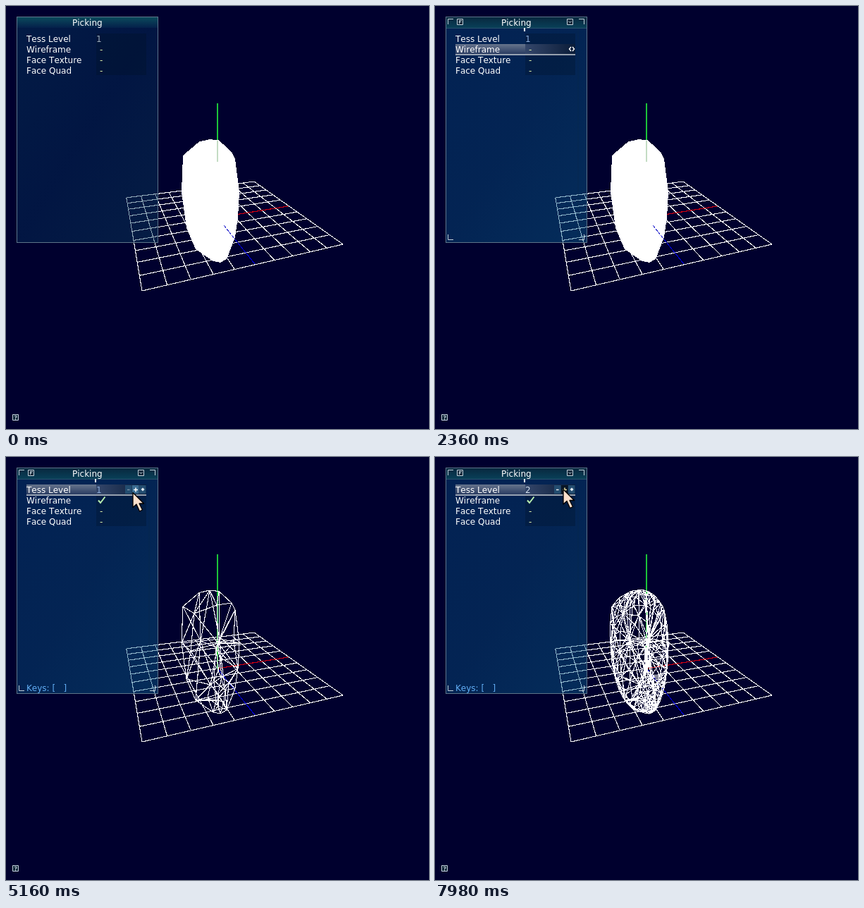
An HTML page for the animation above (8000 ms loop, 600x600 px).

```html
<!DOCTYPE html>
<html lang="en">
<head>
<meta charset="utf-8">
<title>Picking</title>
<style>
  html, body { margin: 0; width: 100%; height: 100%; overflow: hidden; background: #00002e; }
  svg { display: block; width: 100vw; height: 100vh; }
  text { font: 12px "DejaVu Sans", sans-serif; font-kerning: none; fill: #fff; white-space: pre; }
  .line { fill: none; stroke: #fff; stroke-width: 1.1; }
  .mark { fill: none; stroke: #c3d0da; stroke-width: 1; }
  .icon { fill: #12283a; stroke: #c3d0da; stroke-width: 1; }
</style>
</head>
<body>
<svg viewBox="0 0 600 600">
  <defs>
    <linearGradient id="idleFill" x2="1" y2="1">
      <stop offset="0" stop-color="#053c62"/><stop offset=".5" stop-color="#04305c"/><stop offset="1" stop-color="#0b4060"/>
    </linearGradient>
    <linearGradient id="activeFill" x2="1" y2="1">
      <stop offset="0" stop-color="#064b80"/><stop offset=".5" stop-color="#075081"/><stop offset="1" stop-color="#0a6391"/>
    </linearGradient>
    <linearGradient id="idleTitle" x2="0" y2="1">
      <stop offset="0" stop-color="#0b4a5c"/><stop offset="1" stop-color="#04204a"/>
    </linearGradient>
    <linearGradient id="activeTitle" x2="0" y2="1">
      <stop offset="0" stop-color="#08283f"/><stop offset="1" stop-color="#094058"/>
    </linearGradient>
    <linearGradient id="hoverTitle" x2="0" y2="1">
      <stop offset="0" stop-color="#052c38"/><stop offset="1" stop-color="#020f14"/>
    </linearGradient>
    <linearGradient id="label" x2="0" y2="1">
      <stop offset="0" stop-color="#66748c"/><stop offset="1" stop-color="#2a3c62"/>
    </linearGradient>
    <linearGradient id="value">
      <stop offset="0" stop-color="#34466a"/><stop offset="1" stop-color="#0a1c38"/>
    </linearGradient>
  </defs>
  <rect width="600" height="600" fill="#00002e"/>

  <g shape-rendering="crispEdges">
    <path id="grid" class="line"/>
    <g fill="none" stroke-width="1.2">
      <path d="M300 300L400 284" stroke="#d00010"/>
      <path d="M300 300L353 366" stroke="#0000d0"/>
      <path d="M300 300V138" stroke="#1cc43a" stroke-width="2"/>
    </g>
    <g id="solid">
      <polygon id="body" fill="#fff"/>
      <path d="M300 191V221" stroke="#c4dcc4" stroke-width="2"/>
      <path d="M309 311L324 330" stroke="#3030d0" stroke-dasharray="5 1"/>
    </g>
    <path id="wire1" class="line"/>
    <path id="wire2" class="line"/>
  </g>

  <g id="panel">
    <rect id="back" x="15.5" y="15.5" width="200" height="320" fill-opacity=".45" stroke="#5d7488"/>
    <rect id="title" x="16" y="16" width="199" height="15"/>
    <rect x="128" y="39" width="71" height="59" fill="#001020" fill-opacity=".28"/>
    <g id="frame">
      <path d="M16 31.5H215" stroke="#28506c"/>
      <path d="M203 32V335" stroke="#0a2848" stroke-opacity=".5"/>
      <path class="mark" d="M18.5 26V18.5H26M204 18.5H211.5V26M18.5 324V331.5H26M204 331.5H211.5V324"/>
      <path class="icon" d="M31.5 18.5h8v8h-8zM187.5 18.5h8v8h-8z"/>
      <path class="mark" d="M34.5 25V20.5H38M34.5 22.5H37M189.5 21.5L191.5 23.5L193.5 21.5" stroke-width="1.3"/>
      <path d="M127 31V36" stroke="#fff" stroke-width="2"/>
    </g>
    <g id="highlight">
      <rect x="29" y="39" width="99" height="14" fill="url(#label)"/>
      <rect x="128" y="39" width="71" height="14" fill="url(#value)"/>
      <path d="M29 54H199" stroke="#c8ccd2" stroke-width="1.4"/>
    </g>
    <text x="94" y="28">Picking</text>
    <g id="rows"></g>
    <path id="check" d="M131 61.5L134 65L140.500 56.500" fill="none" stroke="#b8f0b0" stroke-width="2"/>
    <path id="arrows" d="M193 58L190.500 61L193 64M195 58L197.500 61L195 64" fill="none" stroke="#fff" stroke-width="1.4"/>
    <g id="buttons">
      <path d="M169 40h9.500v12h-9.500zM189 40h9.500v12h-9.500z" fill="#234d70"/>
      <path id="plusBack" d="M179 40h9.500v12h-9.500z"/>
      <path id="minus" d="M172 46.500H175.500" stroke="#fff" stroke-width="1.4"/>
      <path id="plus" d="M181 46.500H187M184 43.500V49.500" stroke="#fff" stroke-width="1.5"/>
      <path d="M194 43.500L196.500 46L194 48.500L191.500 46Z" fill="#e4edf4"/>
    </g>
    <text id="keys" x="29" y="332" style="fill:#62aef5">Keys: [   ]</text>
  </g>

  <path class="icon" d="M9.500 579.500h8v8h-8z"/>
  <path class="mark" d="M12 581.500H15V583.500H13.500V585M13.500 585.500V587" stroke-width="1.3"/>
  <path id="cursor" d="M0 0V21L5 16.500L9.500 26.500L13.500 24.500L9 15.500H15.500Z" fill="#fde0cc" stroke="#000" stroke-width="1.3" stroke-linejoin="round"/>
</svg>
<script>
const $ = id => document.getElementById(id);
const LOOP = 8000;
const TIMES = { active: 1200, titleLeave: 1800, wireHover: 2040, wireOn: 3720, tessHover: 4440, cursor: 4560, press: 5900, levelUp: 7080 };

// Ground plane in perspective, x and z from -1 to 1.
function project(x, z) {
  const w = 1 + .0935 * x - .2525 * z;
  return [300 + (109.85 * x + 39.85 * z) / w, 299.7 + (50.2 * z - 18 * x) / w];
}
const segment = (a, b) => `M${a.map(v => v.toFixed(1))}L${b.map(v => v.toFixed(1))}`;

let gridPath = "";
for (let i = -5; i <= 5; i++) {
  const u = i / 5;
  gridPath += segment(project(u, -1), project(u, i ? 1 : 0)) + segment(project(-1, u), project(i ? 1 : 0, u));
}
$("grid").setAttribute("d", gridPath);

// Body: a shared rim with separate near and far points.
const rim = [[251, 212], [274, 192.5], [289, 189], [302, 190.5], [320, 207], [325, 217], [331, 264], [329, 300],
  [325, 328], [313, 359], [304, 364], [294, 362], [269, 345], [256, 315], [249, 264]];
const near = [[267, 222], [299, 210], [262, 275], [301, 264], [290, 323], [306, 312], [316, 320], [286, 341], [301, 336], [301, 353]];
const far = [[276, 261], [303, 258], [323, 262], [298, 270], [305, 285], [301, 303], [295, 317], [311, 331], [298, 345], [309, 347]];
$("body").setAttribute("points", rim.join(" "));

// Stage position to unit sphere and back; side is 1 near, -1 far, 0 on the rim.
function toSphere([x, y], side) {
  const u = (x - 290) / 41, v = (y - 277) / 88;
  return [u, v, side * Math.sqrt(Math.max(0, 1 - u * u - v * v))];
}
const toStage = ([u, v]) => [290 + 41 * u, 277 + 88 * v];

// Delaunay triangles of flat points.
function triangulate(pts) {
  const found = [], n = pts.length;
  for (let i = 0; i < n; i++) for (let j = i + 1; j < n; j++) for (let k = j + 1; k < n; k++) {
    const [[ax, ay], [bx, by], [cx, cy]] = [pts[i], pts[j], pts[k]];
    const d = 2 * (ax * (by - cy) + bx * (cy - ay) + cx * (ay - by));
    if (Math.abs(d) < 1e-6) continue;
    const a = ax * ax + ay * ay, b = bx * bx + by * by, c = cx * cx + cy * cy;
    const x = (a * (by - cy) + b * (cy - ay) + c * (ay - by)) / d;
    const y = (a * (cx - bx) + b * (ax - cx) + c * (bx - ax)) / d;
    const r = Math.hypot(ax - x, ay - y) - 1e-6;
    if (pts.every(p => Math.hypot(p[0] - x, p[1] - y) >= r)) found.push([pts[i], pts[j], pts[k]]);
  }
  return found;
}

// Mean of points, lifted back to their mean distance from the centre.
function blend(...pts) {
  const sum = [0, 1, 2].map(i => pts.reduce((s, p) => s + p[i], 0));
  const radius = pts.reduce((s, p) => s + Math.hypot(...p), 0) / pts.length;
  return sum.map(v => v * radius / Math.hypot(...sum));
}
// Six triangles fanned around the middle.
function subdivide([a, b, c]) {
  const around = [a, blend(a, b), b, blend(b, c), c, blend(c, a)], hub = blend(a, b, c);
  return around.map((p, i) => [hub, p, around[(i + 1) % 6]]);
}
function wirePath(triangles) {
  const edges = new Set();
  for (const t of triangles) t.forEach((p, i) => {
    const [a, b] = [p, t[(i + 1) % 3]].map(toStage).sort((m, n) => m[0] - n[0] || m[1] - n[1]);
    edges.add(segment(a, b));
  });
  return [...edges].join("");
}
const half = (inner, side) => triangulate([...rim.map(p => toSphere(p, 0)), ...inner.map(p => toSphere(p, side))]);
const mesh = [...half(near, 1), ...half(far, -1)];
$("wire1").setAttribute("d", wirePath(mesh));
$("wire2").setAttribute("d", wirePath(mesh.flatMap(subdivide)));

$("rows").innerHTML = ["Tess Level", "Wireframe", "Face Texture", "Face Quad"].map((name, i) => {
  const y = 51 + 15 * i;
  return `<text x="29" y="${y}">${name}</text>` +
    (i ? `<text id="value${i}" x="133" y="${y}" style="fill:#dcf0a8">-</text>` : `<text id="value0" x="128" y="${y}">1</text>`);
}).join("");

const show = (id, on) => $(id).style.display = on ? "" : "none";
const fill = (id, value) => $(id).style.fill = value;

function draw(t) {
  const active = t >= TIMES.active, wire = t >= TIMES.wireOn, tess = t >= TIMES.tessHover;
  const level = t >= TIMES.levelUp ? 2 : 1, pressed = t >= TIMES.press;
  fill("back", active ? "url(#activeFill)" : "url(#idleFill)");
  fill("title", !active ? "url(#idleTitle)" : t < TIMES.titleLeave ? "url(#hoverTitle)" : "url(#activeTitle)");
  show("frame", active);
  show("highlight", t >= TIMES.wireHover);
  $("highlight").setAttribute("transform", `translate(0 ${tess ? 0 : 15})`);
  show("arrows", t >= TIMES.wireHover && !tess);
  show("buttons", tess);
  show("keys", tess);
  show("solid", !wire);
  show("wire1", wire && level === 1);
  show("wire2", wire && level === 2);
  show("check", wire);
  show("value1", !wire);
  $("value0").textContent = level;
  fill("value0", level === 2 ? "#d4e0ee" : t >= TIMES.wireHover ? "#8cabda" : "#9cabb9");
  $("minus").style.opacity = level === 2 ? 1 : .4;
  fill("plusBack", pressed ? "#081626" : "#3a6c92");
  $("plus").style.stroke = pressed ? "#e8dca0" : "#fff";
  show("cursor", t >= TIMES.cursor);
  const move = Math.min(1, Math.max(0, (t - 5400) / 300));
  $("cursor").setAttribute("transform", `translate(${180 + 2 * move} ${50.5 - 4.5 * move})`);
}

const start = performance.now();
function tick() {
  draw((performance.now() - start) % LOOP);
  requestAnimationFrame(tick);
}
tick();
</script>
</body>
</html>
```
